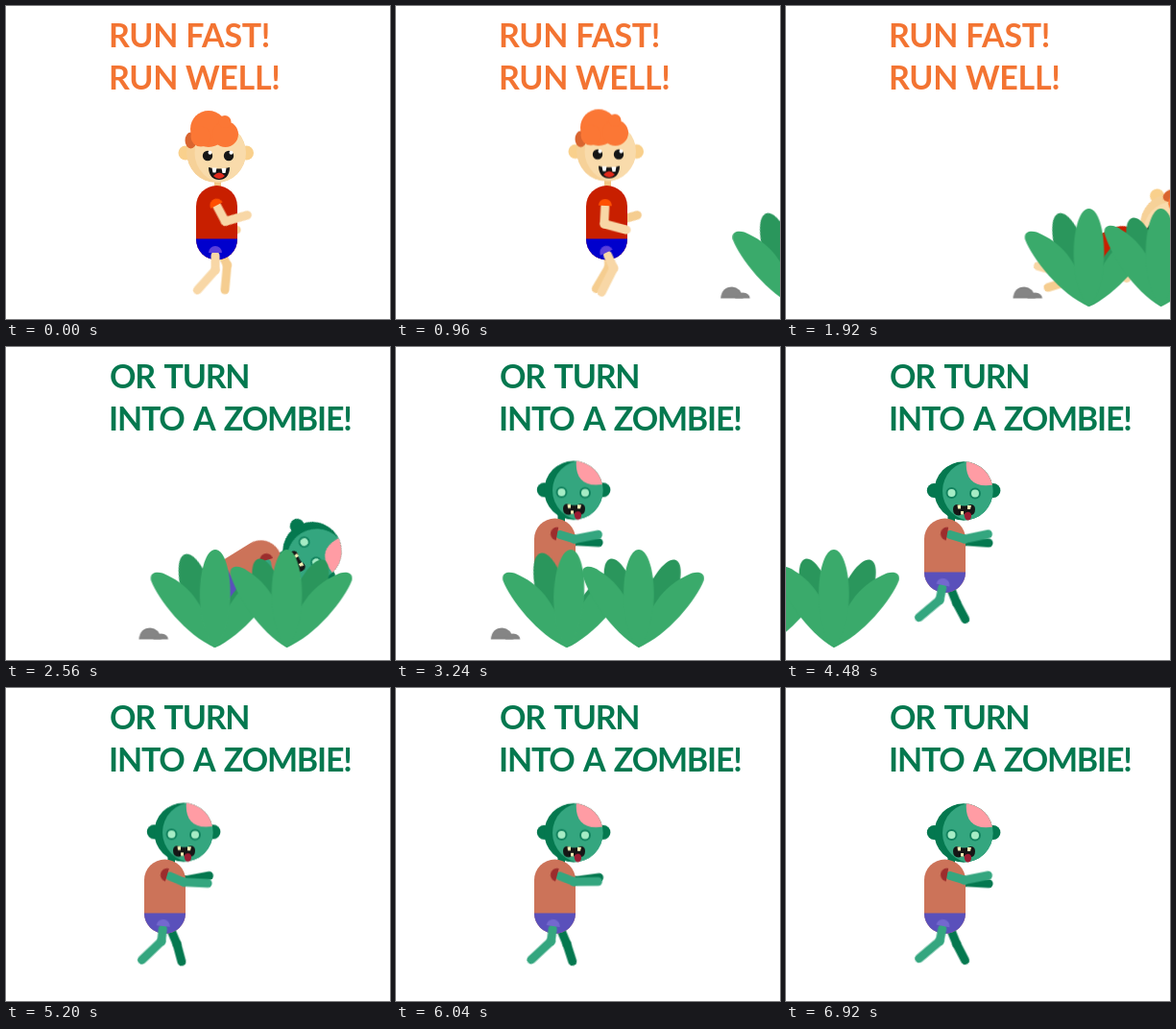
An HTML page without scripts that plays this animation: 400 by 326 pixels, repeating every 7000 ms.

```html
<!DOCTYPE html>
<html lang="en">
<head>
<meta charset="utf-8">
<title>Run fast, run well</title>
<style>
html, body { margin: 0; width: 100%; height: 100%; overflow: hidden; background: #fff; }
svg { display: block; width: 400px; height: 326px; }
text { font: bold 34px Lato, "Open Sans", sans-serif; }
line { stroke-width: 9; stroke-linecap: round; }

/* 7 s story */
.ground, .carried, .fall, .runner, .zombie, .rise, .warn, .doom, .droop, .lean, .stance {
  animation: 7s linear infinite;
}
.ground { animation-name: ground; }
.carried { animation-name: carried; }
.fall { animation-name: fall; transform-origin: 215px 290px; }
.runner { animation-name: leave; animation-timing-function: step-end; }
.zombie { animation-name: enter; animation-timing-function: step-end; }
.rise { animation-name: rise; transform-origin: 166px 285px; }
.warn { animation-name: warn; fill: #f37432; letter-spacing: -.3px; }
.doom { animation-name: doom; fill: #04784f; letter-spacing: -1.2px; word-spacing: 3.5px; }
.droop { animation-name: droop; }
.lean { animation-name: lean; }
.stance { animation-name: stance; }

@keyframes ground {
  0% { transform: translateX(495.5px); }
  22.61%, 28% { transform: translateX(236.5px); }
  39.43%, 45.67% { transform: translateX(106px); }
  74.29%, 100% { transform: translateX(-222px); }
}
@keyframes carried {
  0%, 28% { transform: none; }
  39.43%, 100% { transform: translateX(-131px); }
}
@keyframes fall {
  0%, 22.61% { transform: translate(0, 0) rotate(0deg); }
  27.43% { transform: translate(59px, -9px) rotate(65deg); }
  29.5%, 100% { transform: translate(68px, -28px) rotate(88deg); }
}
@keyframes leave { 0% { opacity: 1; } 35.43%, 100% { opacity: 0; } }
@keyframes enter { 0% { opacity: 0; } 35.43%, 100% { opacity: 1; } }
@keyframes rise {
  0%, 35.43% { transform: translate(40px, -25px) rotate(85deg); animation-timing-function: ease-out; }
  41.1%, 100% { transform: translate(0, 0) rotate(0deg); }
}
@keyframes warn { 0%, 29.7% { opacity: 1; } 32%, 99.99% { opacity: 0; } 100% { opacity: 1; } }
@keyframes doom { 0%, 30.8% { opacity: 0; } 33.7%, 100% { opacity: 1; } }
@keyframes droop { 0%, 45% { transform: translateY(-.7px); } 92.5%, 100% { transform: translateY(1px); } }
@keyframes lean { 0%, 36% { transform: rotate(0deg); } 41%, 100% { transform: rotate(2.5deg); } }
@keyframes stance { 0%, 46.5% { transform: rotate(-25deg); } 52%, 100% { transform: rotate(0deg); } }

/* running: 11 strides per loop */
.bob, .swing, .thigh, .knee, .knee2 { animation: calc(7s / 11) ease-in-out infinite; }
.bob { animation-name: bob; }
.swing { animation-name: swing; }
.thigh { animation-name: thigh; animation-timing-function: linear; }
.knee { animation-name: knee; animation-timing-function: linear; }
.knee2 { animation-name: knee2; animation-timing-function: linear; }
.off { animation-delay: calc(-7s / 22); }
@keyframes bob { 50% { transform: translateY(-1.5px); } }
@keyframes swing { 0%, 100% { transform: rotate(-28deg); } 50% { transform: rotate(3deg); } }
@keyframes thigh {
  0%, 100% { transform: rotate(0deg); }
  25% { transform: rotate(-45deg); }
  50% { transform: rotate(-27deg); }
  75% { transform: rotate(25deg); }
}
@keyframes knee {
  0%, 100% { transform: rotate(42deg); }
  25% { transform: rotate(65deg); }
  50% { transform: rotate(53deg); }
  75% { transform: rotate(18deg); }
}
@keyframes knee2 {
  0%, 100% { transform: rotate(32deg); }
  25% { transform: rotate(18deg); }
  50% { transform: rotate(31deg); }
  75% { transform: rotate(65deg); }
}

/* shuffling: 6 cycles per loop */
.reach, .wrist, .drag, .drag2, .shin, .shin2 {
  animation: calc(7s / 6) ease-in-out -.163s infinite;
}
.reach { animation-name: reach; }
.wrist { animation-name: wrist; }
.late { animation-delay: -.746s; }
.drag { animation-name: drag; }
.drag2 { animation-name: drag2; }
.shin { animation-name: shin; }
.shin2 { animation-name: shin2; }
@keyframes reach { 0%, 100% { transform: rotate(0deg); } 50% { transform: rotate(7deg); } }
@keyframes wrist { 0%, 100% { transform: rotate(-12deg); } 50% { transform: rotate(-3deg); } }
@keyframes drag { 0%, 100% { transform: rotate(12deg); } 50% { transform: rotate(6deg); } }
@keyframes shin { 0%, 100% { transform: rotate(38deg); } 50% { transform: rotate(40deg); } }
@keyframes drag2 { 0%, 100% { transform: rotate(-22deg); } 50% { transform: rotate(-23deg); } }
@keyframes shin2 { 0%, 100% { transform: rotate(-6deg); } 50% { transform: rotate(9deg); } }
</style>
</head>
<body>
<svg viewBox="0 0 400 326">
  <defs>
    <path id="leaf" d="M0 0C-24 -25 -18 -102 0 -102S24 -25 0 0"/>
    <path id="side" d="M0 0C-30 -13 -59 -50 -66.500 -70C-68.500 -80 -57 -80 -49 -75C-26 -64 -9 -44 0 0"/>
    <path id="cap" d="M-7 3A7 7 0 0 1 7 3Z"/>
    <clipPath id="face"><circle cx="219" cy="153" r="31"/></clipPath>
    <clipPath id="skull"><circle cx="185" cy="150" r="30.700"/></clipPath>
    <clipPath id="torso"><rect x="198" y="187" width="43" height="77.500" rx="21.500"/></clipPath>
    <clipPath id="trunk"><rect x="144" y="178.500" width="43" height="77.500" rx="21.500"/></clipPath>
  </defs>

  <g class="warn">
    <text x="107" y="43">RUN FAST!</text>
    <text x="107" y="86.500">RUN WELL!</text>
  </g>
  <g class="doom">
    <text x="108" y="43">OR TURN</text>
    <text x="107" y="86.500">INTO A ZOMBIE!</text>
  </g>

  <g class="runner"><g class="carried"><g class="fall">
    <g stroke="#f5cd90">
      <g transform="translate(218 205)"><g class="swing off">
        <line y2="22"/>
        <g transform="translate(0 22) rotate(-78)"><line y2="24"/></g>
      </g></g>
      <g transform="translate(221 251)"><g class="thigh off">
        <line y2="21"/>
        <g transform="translate(0 21)"><g class="knee2"><line y2="26"/></g></g>
      </g></g>
    </g>
    <rect x="217" y="178" width="7" height="14" fill="#f3c684"/>
    <g clip-path="url(#torso)">
      <rect x="198" y="187" width="43" height="78" fill="#c81f00"/>
      <rect x="198" y="242.500" width="43" height="23" fill="#0000cd"/>
    </g>
    <g transform="translate(218 254)" stroke="#f8d7a6"><g class="thigh">
      <line y1="6" y2="21"/>
      <g transform="translate(0 21)"><g class="knee"><line y2="28"/></g></g>
      <use href="#cap" fill="#5a3fdc" stroke="none"/>
    </g></g>
    <g transform="translate(218 205)" stroke="#f8d7a6"><g class="swing">
      <line y1="4" y2="22"/>
      <g transform="translate(0 22) rotate(-78)"><line y2="24"/></g>
      <use href="#cap" fill="#ff5000" stroke="none"/>
    </g></g>
    <g class="bob">
      <g fill="#f9d08c"><circle cx="187" cy="153" r="7.500"/><circle cx="250.500" cy="153" r="7.500"/></g>
      <g clip-path="url(#face)">
        <circle cx="219" cy="153" r="31" fill="#f6d198"/>
        <circle cx="228" cy="153" r="31.500" fill="#f9dbab"/>
      </g>
      <ellipse cx="192.500" cy="140" rx="6" ry="8.500" fill="#d9642f"/>
      <g fill="#fb7735">
        <circle cx="211" cy="128" r="19"/>
        <circle cx="228.500" cy="133.500" r="13.500"/>
        <circle cx="228" cy="120.500" r="6.500"/>
        <circle cx="203" cy="136" r="10.500"/>
      </g>
      <g fill="#161616"><circle cx="210" cy="156" r="5.200"/><circle cx="232" cy="156" r="5.200"/></g>
      <g fill="#fff"><circle cx="212.500" cy="152.800" r="2"/><circle cx="234.500" cy="152.800" r="2"/></g>
      <path d="M211 168Q222 171 233 168C233 177 228 181 222 181S211 177 211 168" fill="#161616"/>
      <path d="M216 177Q222 170 228 177Q222 183 216 177" fill="#e02a1c"/>
      <path d="M214.500 168.500h5l-1 5h-3zM224.500 169h5l-1 5h-3z" fill="#fff"/>
    </g>
  </g></g></g>

  <g class="zombie"><g class="rise">
    <g stroke="#04784f">
      <g transform="translate(167 194)"><g class="reach late">
        <line x2="20" y2="6"/>
        <g transform="translate(20 6)"><g class="wrist late"><line x2="25"/></g></g>
      </g></g>
      <g transform="translate(171 250)"><g class="drag2">
        <line y2="18"/>
        <g transform="translate(0 18)"><g class="shin2"><line y2="19"/></g></g>
      </g></g>
    </g>
    <rect x="168.500" y="174" width="7.500" height="12" fill="#04784f"/>
    <g clip-path="url(#trunk)">
      <rect x="144" y="178" width="43" height="79" fill="#cc7359"/>
      <rect x="144" y="234.500" width="43" height="22" fill="#5a50bb"/>
    </g>
    <g transform="translate(164 245)" stroke="#34a67f"><g class="stance"><g class="drag">
      <line y1="6" y2="19"/>
      <g transform="translate(0 19)"><g class="shin"><line y2="28"/></g></g>
      <use href="#cap" fill="#7468cf" stroke="none"/>
    </g></g></g>
    <g transform="translate(166 194)" stroke="#34a67f"><g class="reach">
      <line x1="5" y1="1.500" x2="20" y2="6"/>
      <g transform="translate(20 6)"><g class="wrist"><line x2="25"/></g></g>
      <use href="#cap" transform="translate(-1 0) rotate(-80)" fill="#9c2d2d" stroke="none"/>
    </g></g>
    <g class="droop">
      <g fill="#04784f">
        <circle cx="154.200" cy="149.500" r="7.400"/>
        <circle cx="216" cy="149.500" r="7.400"/>
      </g>
      <g clip-path="url(#skull)">
        <circle cx="185" cy="150" r="31" fill="#04784f"/>
        <circle cx="194" cy="150" r="31" fill="#34a67f"/>
        <path d="M188 118C186 138 196 148 219 143V118Z" fill="#ff9ca4"/>
      </g>
      <g fill="#a5ecc5" stroke="#12835f" stroke-width="2">
        <circle cx="172.500" cy="152" r="5"/><circle cx="197" cy="152.500" r="5"/>
      </g>
      <path d="M174 169Q174 164 179 164Q185.500 167 192 164Q197 164 197 169Q197 175.500 191 175.500L185 174L180 175.500Q174 175 174 169" fill="#161616"/>
      <path d="M185.500 174Q190 169.500 193 174V177Q192 180.500 189.500 180.500T186 177Z" fill="#9b1c33"/>
      <path d="M178.500 164.500h3.500v4h-3zM189 165h4l-1 4h-3zM182 171h3v3.500h-3z" fill="#f3f0b4"/>
    </g>
  </g></g>

  <g class="ground">
    <g fill="#858585">
      <path d="M0 304.500Q1 292.500 12 292.500Q21 293 23.500 304.500Z"/>
      <path d="M15 304.500Q17 298.500 23 298.500Q30 299 30.500 304.500Z"/>
    </g>
    <g transform="translate(79 313)" fill="#3aaa6b">
      <g fill="#2a965c">
        <g class="lean"><use href="#leaf" transform="rotate(-18)"/></g>
        <use href="#leaf" transform="rotate(30) scale(.8)"/>
      </g>
      <use href="#side"/>
      <use href="#side" transform="scale(-1 1)"/>
      <g class="lean"><use href="#leaf"/></g>
    </g>
    <g transform="translate(154 313)" fill="#3aaa6b">
      <g fill="#2a965c">
        <use href="#leaf" transform="rotate(-18) scale(.95)"/>
        <use href="#leaf" transform="rotate(23) scale(.97)"/>
      </g>
      <use href="#side" transform="rotate(6)"/>
      <use href="#side" transform="scale(-1.02 1)"/>
      <use href="#leaf"/>
    </g>
  </g>
</svg>
</body>
</html>
```
